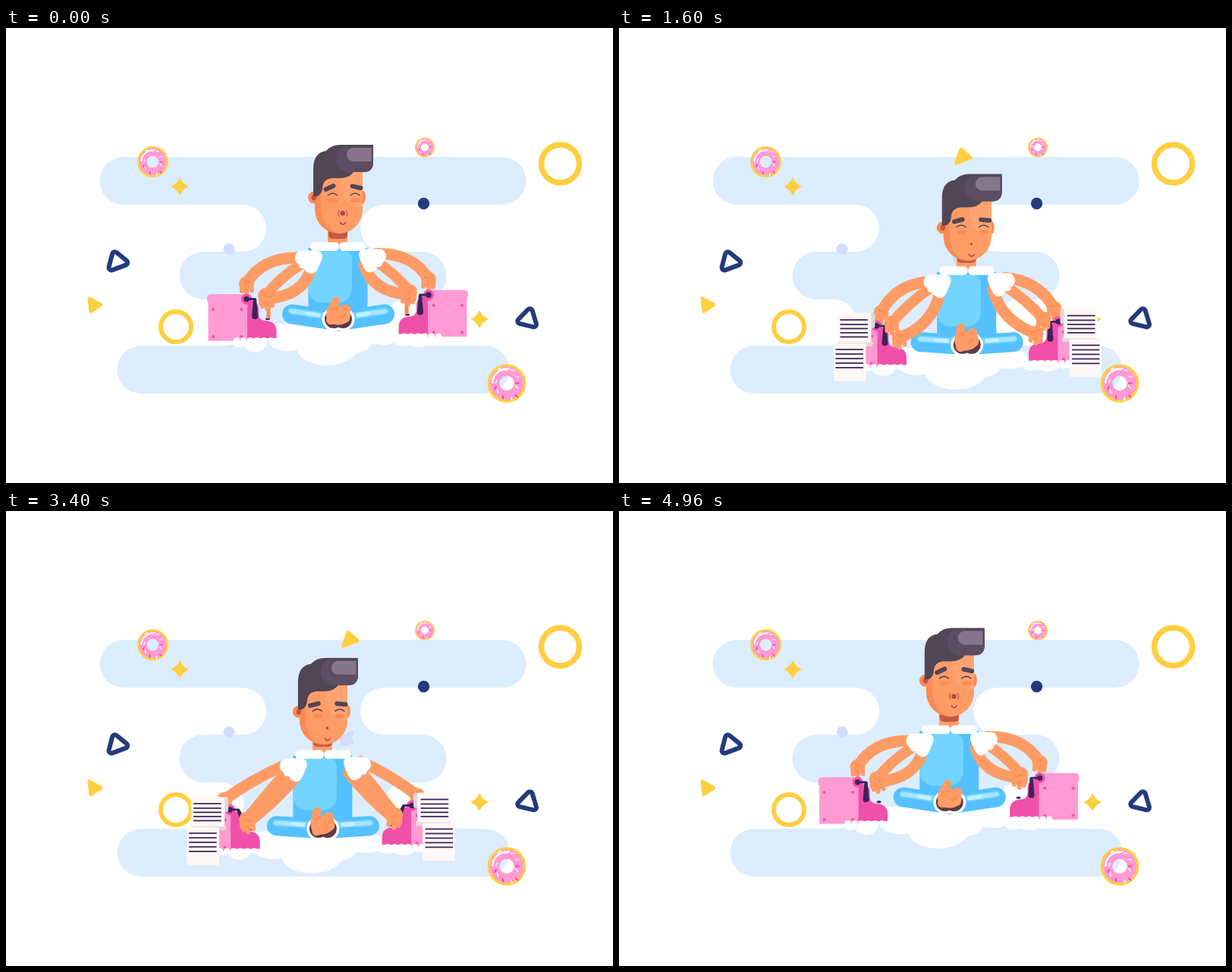
Recreate the animation shown at these times as an HTML page with a canvas. Size 800 by 600 pixels, loop 5 s.

```html
<!DOCTYPE html>
<html lang="en">
<head>
<meta charset="utf-8">
<title>Calm multitasking</title>
<style>
html, body { margin: 0; width: 100%; height: 100%; overflow: hidden; background: #fff; }
canvas { display: block; }
</style>
</head>
<body>
<canvas id="stage" width="800" height="600"></canvas>
<script>
const g = document.getElementById('stage').getContext('2d');
const LOOP = 5000, STEP = 40, TURN = 5040;
const SKIN = '#ff9c66', SHADE = '#fc8b52', BROWN = '#c25a45', HAIR = '#514656';
const YELLOW = '#ffcf40', NAVY = '#233a7c', LILAC = '#d3dcff', INK = '#3a2459';
const PINK = '#ff9ad3', MAGENTA = '#f150aa', BLUE = '#55c1ff', SKY = '#73d4ff';
g.lineJoin = 'round';

const fill = (d, color) => { g.fillStyle = color; g.fill(new Path2D(d)); };
const stroke = (d, color, width, cap = 'round') => {
  g.lineCap = cap; g.lineWidth = width; g.strokeStyle = color; g.stroke(new Path2D(d));
};
const oval = (x, y, rx, ry, color) => {
  g.fillStyle = color; g.beginPath(); g.ellipse(x, y, rx, ry, 0, 0, 7); g.fill();
};
const dot = (x, y, r, color) => oval(x, y, r, r, color);
const ring = (x, y, r, width, color, from = 0, to = 2 * Math.PI) => {
  g.lineCap = 'round'; g.lineWidth = width; g.strokeStyle = color;
  g.beginPath(); g.arc(x, y, r, from, to); g.stroke();
};
const box = (x, y, w, h, r, color) => {
  g.fillStyle = color; g.beginPath(); g.roundRect(x, y, w, h, r); g.fill();
};
const at = (x, y, draw, angle = 0, sx = 1, sy = sx) => {
  g.save(); g.translate(x, y); g.rotate(angle * Math.PI / 180); g.scale(sx, sy); draw(); g.restore();
};
const clamp = v => Math.max(0, Math.min(1, v));

// Key poses, eased between the given times
const TIMES = [0, 760, 1600, 2640, 3400, 4160, LOOP];
function pose(values, t) {
  let i = 0;
  while (t >= TIMES[i + 1]) i++;
  const u = (t - TIMES[i]) / (TIMES[i + 1] - TIMES[i]);
  const e = (1 - Math.cos(Math.PI * u)) / 2, a = values[i], b = values[(i + 1) % values.length];
  return a.map((v, k) => v + (b[k] - v) * e);
}
const ARMS = [
  { from: [386, 303], bend: [-7, -9], width: 15,
    hand: [[317, 337], [307, 339], [323, 340], [322, 352], [310, 344], [304, 340]] },
  { from: [390, 311], bend: [-2, -2], width: 14,
    hand: [[342, 353], [342, 355], [337, 354], [341, 371], [339, 370], [342, 359]] },
  { from: [402, 318], bend: [9, 8], width: 15,
    hand: [[344, 357], [344, 357], [347, 373], [358, 372], [341, 374], [336, 374]] }
];
const CURL = [[1], [.5], [.9], [.4], [.2], [.25]];
const SWING = [[0], [0], [0], [0], [-25], [-20]];

function donut(x, y, r) {
  at(x, y, () => {
    ring(0, 0, .92, .15, YELLOW);
    ring(0, 0, .62, .48, PINK);
    ring(0, 0, .74, .1, '#fff', 3.2, 4.8);
    for (let i = 0; i < 12; i++) {
      const a = i * 2.4, d = .54 + .1 * (i % 4);
      at(d * Math.cos(a), d * Math.sin(a),
        () => stroke('M-.08 0H.08', i % 3 ? '#fff' : '#e23a9c', .06), i * 73);
    }
  }, 0, r);
}

function roundTriangle(a, b, c) {
  g.lineWidth = 6; g.strokeStyle = NAVY;
  g.beginPath();
  g.moveTo((a[0] + c[0]) / 2, (a[1] + c[1]) / 2);
  g.arcTo(...a, ...b, 3.5);
  g.arcTo(...b, ...c, 3.5);
  g.arcTo(...c, ...a, 3.5);
  g.closePath(); g.stroke();
}

function background() {
  fill('M155 170H654a31.5 31.5 0 0 1 0 63H498a31 31 0 0 0 0 62H549a31.5 31.5 0 0 1 0 63H527' +
    'a30.5 30.5 0 0 0 0 61H632a31.5 31.5 0 0 1 0 63H178a31.5 31.5 0 0 1 0-63H283' +
    'a30.5 30.5 0 0 0 0-61H260a31.5 31.5 0 0 1 0-63H312a31 31 0 0 0 0-62H155a31.5 31.5 0 0 1 0-63z', '#dcedff');
  ring(730.5, 179, 25, 7.5, YELLOW);
  ring(224, 394, 20, 6, YELLOW);
  dot(550.5, 231.5, 7.7, NAVY);
  dot(294, 291.5, 7.5, LILAC);
  for (const [x, y] of [[229, 209], [624, 384]])
    at(x, y, () => {
      const star = 'M0-10Q3-3 10 0Q3 3 0 10Q-3 3-10 0Q-3-3 0-10z';
      fill(star, YELLOW);
      stroke(star, YELLOW, 2);
    });
  roundTriangle([141.5, 292.5], [163.5, 310.5], [134, 321.5]);
  roundTriangle([692, 367], [671, 388.5], [700.5, 395.5]);
  const solid = (d, color) => { fill(d, color); stroke(d, color, 5); };
  solid('M110 357L124.5 365L112 373.5z', YELLOW);
  solid('M451 160L463 171L444.5 178z', YELLOW);
  solid('M456 292L442 300L443 308L456 305L453 299z', LILAC);
  donut(193.5, 176.5, 20.5);
  donut(552, 157.5, 13);
  donut(660, 468.5, 25.5);
}

function cloud() {
  box(345, 390, 155, 27, 10, '#fff');
  [[423, 420, 41, 25], [372, 410, 27, 16], [328, 414, 16, 13], [307, 414, 9, 7], [290, 412, 12, 7],
   [461, 412, 22, 16], [497, 405, 21, 13], [523, 411, 14, 9], [544, 411, 17, 10], [566, 409, 13, 8]]
    .forEach(e => oval(...e, '#fff'));
}

function torso() {
  box(424, 255, 26, 35, 0, SKIN);
  box(425, 258, 25, 20, [0, 0, 5, 5], BROWN);
  box(398.5, 290, 78, 85, 0, BLUE);
  box(398.5, 293, 57.5, 69, [0, 12, 18, 18], SKY);
  box(401.5, 282.5, 37.5, 11.5, 5, '#fff');
  box(439.5, 282.5, 34.5, 11.5, 5, '#fff');
}

function head(c) {
  const lift = 5 * c, chin = 271 - 3.5 * c, r = 32;
  oval(470, 223 + lift * .4, 4, 9, SHADE);
  fill(`M407 190H470V${chin - r}A31.5 ${r} 0 0 1 407 ${chin - r}z`, SHADE);
  fill(`M415 190H470V${chin - r}A31.5 ${r} 0 0 1 438.5 ${chin}Q415 264 415 232z`, SKIN);
  fill('M441 190H470V237Q441 232 441 205z', '#ffa471');
  dot(406, 223.5 + lift * .4, 8, SHADE);
  oval(406, 223.5 + lift * .4, 3.2, 4, BROWN);
  fill('M405 222V186Q405 164 422 162Q429 154 441 154H484V177Q484 190 471 190H458' +
    'Q452 198 440 198H430Q417 199 417 212Q416 219 410 222z', HAIR);
  fill('M448 157H484V177Q484 190 471 190H451Q435 188 435 172Q435 158 448 157z', '#5c4d63');
  fill('M458 158H481.5V176H458a9 9 0 0 1 0-18z', '#87758c');
  at(0, lift, () => {
    box(425, 224.5, 12, 5.5, 2.5, SHADE);
    box(454, 224.5, 12, 5.5, 2.5, SHADE);
    stroke('M424.5 220.5Q430.5 215.5 436.5 220.5M454 220.5Q460 215.5 466 220.5', HAIR, 1.6);
    at(426.5, 210.5 + 2 * c, () => stroke('M-5.5 0H5.5', HAIR, 6), -26 + 16 * c);
    at(462, 209.8 + 2 * c, () => stroke('M-5.5 0H5.5', HAIR, 6), 13 - 11 * c);
    stroke('M440.5 256.5Q444 262 447.5 256.5', '#b4443c', 1.6);
  });
  at(443.7, 244.3 + 3 * c, () => {
    dot(0, 0, 3.2, '#b04a3d');
    g.globalAlpha = clamp(1 - 1.7 * c);
    stroke('M-4.5-4Q-7.5 0-4.5 4M4.5-4Q7.5 0 4.5 4', BROWN, 1.2);
  }, 0, 1 - .68 * c);
}

function legs(c) {
  const knee = 377.5 + 52 * c, mid = 386.5 + 45 * c;
  const slope = (mid - knee) / 60;
  for (const side of [1, -1])
    at(438, knee, () => {
      const y = x => slope * (x + 60);
      const line = (a, b, dy, color, w) => stroke(`M${a} ${y(a) + dy}L${b} ${y(b) + dy}`, color, w);
      line(-61, 0, 0, BLUE, 26);
      line(-62, -20, -4, SKY, 9);
      line(-62, -44, -4, '#a5e5ff', 5.5);
      line(-40, -26, -4, '#c3efff', 5.5);
    }, 0, side, 1);
}

function lap(c) {
  at(437, 380 + 48 * c, () => {
    dot(-5, 4, 15.5, '#fff');
    dot(7, 4, 15.5, '#fff');
    dot(-5, 4, 12, '#60394a');
    dot(7, 4, 12, '#60394a');
    at(0, 0, () => {
      oval(1, -1, 16, 12.5, SKIN);
      stroke('M-9-6L-2-20', SKIN, 11);
      stroke('M3-5L11-9', SKIN, 13);
      stroke('M-9 5L10 3', SKIN, 12);
      stroke('M-8-10Q-3-8 0-12M3 2Q8 1 10-3', SHADE, 2);
    }, -20 * c);
  });
}

function paper(length) {
  if (length <= 0) return;
  const rows = (x, ys) => ys.forEach(y => stroke(`M${x} ${y}h36.5`, INK, 1.8, 'butt'));
  const sheet = '#fef7f4', upper = Math.min(length, 39);
  box(-9, -17, 7, Math.min(upper, 20), 3, '#dcd8dc');
  if (length > 39) {
    box(-50, 20, 45, 7, 2, '#dcdada');
    const low = length - 39;
    box(-56.5, 23, 42.5, low, 2, sheet);
    rows(-54, [31, 37, 43, 49, 55].filter(y => y < 22 + low));
  }
  box(-51, -17, 44, upper, 2, sheet);
  const end = upper - 17;
  rows(-48, length > 39 ? [-8, -2, 3.5, 9, 14.5] : [end - 2, end - 26.5, end - 31].filter(y => y > -16));
}

function machine(length, swing) {
  box(266.5, 355, 52, 57.5, 0, PINK);
  if (length <= 0) box(265, 351, 53, 12.5, 5, PINK);
  for (const x of [273, 310.5]) for (const y of [371, 407]) dot(x, y, 2, MAGENTA);
  fill('M318 358Q332 360 333 369V378Q334 386 343 386Q356 387 356.5 399V409H318z', MAGENTA);
  for (let x = 304; x < 358; x += 9) dot(x, 412, 4, '#fff');
  dot(317, 357.5, 7, MAGENTA);
  dot(317, 357.5, 3.7, INK);
  stroke('M317 357.5H328', INK, 2.8);
  at(328, 358, () => fill('M-2-1H2L4 22Q4 26 0 26Q-4 26-4 22z', INK), swing);
  oval(345, 383.5, 3, 1.6, INK);
  at(317, 357.5, () => paper(length));
}

function arm({ from, bend, width, hand }, t, dx, dy) {
  const [x, y] = pose(hand, t), [curl] = pose(CURL, t);
  const sx = from[0] + dx, sy = from[1] + dy;
  const cx = (sx + x) / 2 + 2 * curl * bend[0], cy = (sy + y) / 2 + 2 * curl * bend[1];
  stroke(`M${sx} ${sy}Q${cx} ${cy} ${x} ${y}`, SKIN, width);
  dot(x, y, 10, SKIN);
  stroke(`M${x - 6} ${y + 3}l0 7M${x} ${y + 5}l0 8M${x + 6} ${y + 3}l1 6`, SKIN, 6);
  stroke(`M${x - 4} ${y - 5}q5 5 9 2M${x - 2} ${y + 5}q3 1 3 4`, SHADE, 1.8);
}

function sleeve() {
  fill('M388 293.5H410Q419 296 416.5 304Q412 317 408 322Q403 326 399 323Q394 321 393 317' +
    'Q386 318 386 312Q380 308 381 302Q382 295 388 293.5z', '#fff');
}

function render(t) {
  const angle = 2 * Math.PI * t / TURN, s = Math.sin(angle), c = (1 - Math.cos(angle)) / 2;
  const x = 22.65 * s, bodyY = 45 * c, rigX = 24.6 * s, rigY = 50 * c;
  const length = 89 * Math.min(clamp((t - 50) / 500), clamp((4400 - t) / 600));
  g.clearRect(0, 0, 800, 600);
  background();
  at(x, bodyY, () => { cloud(); torso(); });
  at(x, 54.5 * c, () => head(c));
  at(x, 0, () => legs(c));
  for (const side of [1, -1]) {
    at(rigX + (side < 0 ? 874 : 0), rigY - (side < 0 ? 5.5 : 0), () => {
      const dx = (x - rigX) * side, dy = bodyY - rigY;
      arm(ARMS[0], t, dx, dy);
      machine(length, pose(SWING, t)[0]);
      if (t < 1200) stroke('M346 360V383', SHADE, 5, 'butt');
      arm(ARMS[1], t, dx, dy);
      arm(ARMS[2], t, dx, dy);
    }, 0, side, 1);
    at(x + (side < 0 ? 882 : 0), bodyY - (side < 0 ? 2 : 0), sleeve, 0, side, 1);
  }
  at(x, 0, () => lap(c));
}

const start = performance.now();
function tick() {
  const t = (performance.now() - start) % LOOP;
  render(Math.floor(t / STEP) * STEP);
  requestAnimationFrame(tick);
}
tick();
</script>
</body>
</html>
```
